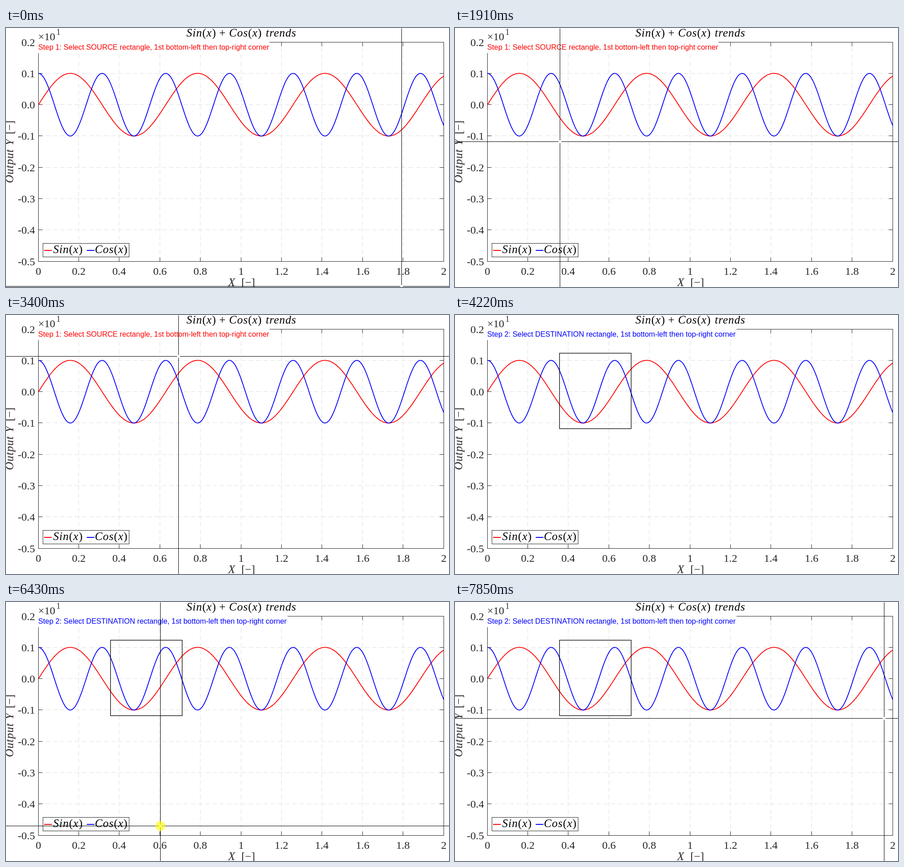
An HTML page that plays this animation: 977x573 px, repeating every 8 s.

```html
<!DOCTYPE html>
<html lang="en">
<head>
<meta charset="utf-8">
<title>Sine and cosine trends</title>
<style>
  html, body { margin: 0; width: 100%; height: 100%; overflow: hidden; background: #fff; }
  svg { display: block; width: 100%; height: 100%; }
  .tick { font: 24px "Liberation Serif", serif; fill: #262626; }
  .math { font: italic 25px "Liberation Serif", serif; letter-spacing: 1px; }
  .math tspan { font-style: normal; }
  .axis { fill: #262626; }
  .step { font: 16.25px "Liberation Sans", sans-serif; }
  .grid { stroke: #dfdfdf; stroke-dasharray: 10 6; }
  .frame { stroke: #262626; fill: none; }
  .curve { fill: none; stroke-width: 1.8; stroke-linejoin: round; }
  .cross { stroke: #000; }
</style>
</head>
<body>
<svg id="stage" viewBox="0 0 977 573"></svg>
<script>
const LEFT = 71.5, RIGHT = 965.5, TOP = 31.5, BOTTOM = 516.5;
const LOOP = 8000;
const stage = document.getElementById('stage');

const px = x => LEFT + x * (RIGHT - LEFT) / 2;
const py = y => TOP + (0.2 - y) * (BOTTOM - TOP) / 0.7;

const line = (x1, y1, x2, y2, attrs) =>
  `<line x1="${x1}" y1="${y1}" x2="${x2}" y2="${y2}" ${attrs}/>`;
const text = (x, y, str, attrs) => `<text x="${x}" y="${y}" ${attrs}>${str}</text>`;
const math = (x, y, str, extra = '') =>
  text(x, y, str.replace(/[()[\]+−]/g, '<tspan>$&</tspan>'), `class="math ${extra}"`);

function curve(fn, color) {
  const points = [];
  for (let x = 0; x <= 2.0001; x += 0.005) {
    points.push(px(x).toFixed(2) + ',' + (py(fn(x)) - 0.4).toFixed(2));
  }
  return `<polyline class="curve" stroke="${color}" points="${points.join(' ')}"/>`;
}

function axes() {
  let grid = '', ticks = '', labels = '';
  for (let i = 0; i <= 10; i++) {
    const x = Math.round(px(i / 5)) - 0.5;
    if (i % 10) grid += line(x, BOTTOM, x, TOP, 'class="grid"');
    ticks += line(x, BOTTOM, x, BOTTOM - 9, 'class="frame"') + line(x, TOP, x, TOP + 9, 'class="frame"');
    labels += text(x, 546, +(i / 5).toFixed(1), 'class="tick" text-anchor="middle"');
  }
  for (let i = -5; i <= 2; i++) {
    const y = Math.round(py(i / 10)) - 0.5;
    if (i > -5 && i < 2) grid += line(LEFT, y, RIGHT, y, 'class="grid"');
    ticks += line(LEFT, y, LEFT + 9, y, 'class="frame"') + line(RIGHT, y, RIGHT - 9, y, 'class="frame"');
    labels += text(64, y + 8.5, (i / 10).toFixed(1), 'class="tick" text-anchor="end"');
  }
  const box = `<rect class="frame" x="${LEFT}" y="${TOP}" width="${RIGHT - LEFT}" height="${BOTTOM - TOP}"/>`;
  return grid + box + ticks + labels;
}

function legend() {
  return '<rect x="81.5" y="476.5" width="190" height="30" fill="#fff" stroke="#262626"/>' +
    line(84, 492, 101, 492, 'stroke="#f00" stroke-width="2"') + math(104, 498, 'Sin(x)') +
    line(178, 492, 195, 492, 'stroke="#00f" stroke-width="2"') + math(196, 498, 'Cos(x)');
}

function titles() {
  const unit = (x, y) => math(x, y, '[', 'axis') + math(x + 8, y, '−', 'axis') + math(x + 22, y, ']', 'axis');
  return math(398, 19, 'Sin(x)') + math(470, 19, '+') + math(492, 19, 'Cos(x)') + math(573, 19, 'trends') +
    math(490, 571, 'X', 'axis') + unit(519, 571) +
    '<g transform="translate(16 343) rotate(-90)">' +
      math(0, 0, 'Output', 'axis') + math(83, 0, 'Y', 'axis') + unit(108, 0) + '</g>' +
    text(71, 27, '×10', 'class="tick"') + text(111, 15, '1', 'class="tick" style="font-size:18px"');
}

function prompt(id, width, color, str) {
  return `<g id="${id}"><rect x="70" y="30" width="${width}" height="25.5" fill="#fff"/>` +
    text(71, 48, str, `class="step" fill="${color}"`) + '</g>';
}

stage.innerHTML = axes() +
  curve(x => 0.1 * Math.sin(10 * x), '#f00') + curve(x => 0.1 * Math.cos(20 * x), '#00f') +
  legend() + titles() +
  prompt('source', 511, '#f00', 'Step 1: Select SOURCE rectangle, 1st bottom-left then top-right corner') +
  prompt('destination', 551, '#00f', 'Step 2: Select DESTINATION rectangle, 1st bottom-left then top-right corner') +
  '<rect id="selection" x="230.5" y="84.5" width="158" height="167" fill="none" stroke="#000" stroke-width="1.3"/>' +
  '<g id="cursor">' +
    '<rect x="-3" y="-3" width="6" height="6" fill="#fff"/>' +
    line(-977, 0, -3, 0, 'class="cross"') + line(3, 0, 977, 0, 'class="cross"') +
    '<line id="upper" x1="0" x2="0" y2="-3" class="cross"/>' + line(0, 3, 0, 573, 'class="cross"') +
    '<circle id="click" r="11" fill="#ff0" fill-opacity=".62"/></g>';

const [source, destination, selection, cursor, upper, click] =
  ['source', 'destination', 'selection', 'cursor', 'upper', 'click'].map(id => document.getElementById(id));

const linear = p => p;
const easeOut = p => 1 - (1 - p) ** 2;
const easeInOut = p => p * p * (3 - 2 * p);

// Pointer path: time, x, y of the pixel, and the easing towards the next stop
const path = [
  [0, 872, 571, linear],
  [285, 872, 571, easeInOut],
  [1180, 250, 260, easeOut],
  [1980, 230, 251, linear],
  [2400, 230, 251, linear],
  [2850, 297, 167, easeOut],
  [3610, 388, 84, linear],
  [4620, 388, 84, easeInOut],
  [5410, 388, 438, easeOut],
  [6020, 340, 495, linear],
  [6480, 340, 495, easeInOut],
  [7850, 946, 257, linear],
  [LOOP, 946, 257, linear]
];
const SAMPLE = 67; // the pointer moves in discrete samples

const clicks = [2310, 3960, 6430];
const show = (el, on) => el.setAttribute('visibility', on ? 'visible' : 'hidden');

function pointer(t) {
  const i = path.findLastIndex(stop => stop[0] <= t);
  const [t0, x0, y0, ease] = path[i];
  const [t1, x1, y1] = path[i + 1];
  const p = ease(Math.floor((t - t0) / SAMPLE) * SAMPLE / (t1 - t0));
  return [x0 + (x1 - x0) * p, y0 + (y1 - y0) * p].map(v => Math.round(v) + 0.5);
}

function draw(now) {
  const t = now % LOOP;
  const [x, y] = pointer(t);
  const second = t >= 4200;
  const cursorOn = t < 4150 || t >= 4680;
  cursor.setAttribute('transform', `translate(${x} ${y})`);
  upper.setAttribute('y1', 1 - y);
  show(cursor, cursorOn);
  show(click, cursorOn && clicks.some(c => t >= c && t < c + 130));
  show(source, !second);
  show(destination, second);
  show(selection, second);
}

function tick() {
  draw(performance.now());
  requestAnimationFrame(tick);
}
tick();
</script>
</body>
</html>
```
